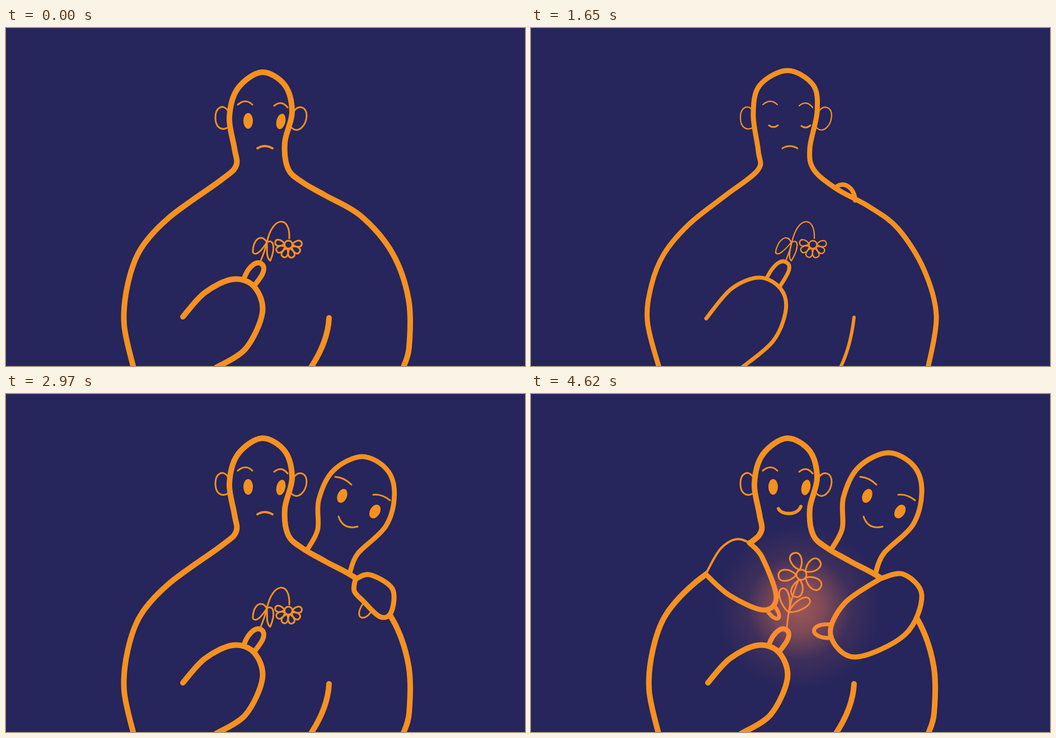
Recreate the animation shown at these times as an HTML page. Size 927 px wide and 604 px high, loop 6.93 s.

```html
<!DOCTYPE html>
<html lang="en">
<head>
<meta charset="utf-8">
<title>Comfort</title>
<style>
  @property --s { syntax: '<number>'; inherits: true; initial-value: 0; }
  html, body { margin: 0; width: 100%; height: 100%; overflow: hidden; background: #26255c; }
  svg {
    display: block; width: 100vw; height: 100vh;
    fill: none; stroke: #f5911f; stroke-width: 9;
    stroke-linecap: round; stroke-linejoin: round;
    animation: slot 6.93s steps(21) infinite;
  }
  /* --s counts the 330 ms slots of the loop, 0 to 20 */
  @keyframes slot { from { --s: 0; } to { --s: 21; } }
  /* shown from slot --a to slot --b */
  .on { opacity: clamp(0, min(var(--s) - var(--a) + 1, var(--b) - var(--s) + 1), 1); }
  /* the light figure jumps up and left for one slot */
  .nudge {
    --k: clamp(0, min(var(--s) - 5, 7 - var(--s)), 1);
    transform: translate(calc(var(--k) * -4px), calc(var(--k) * -3px));
  }
  .skin { fill: #26255c; }
  .dot { fill: #f5911f; stroke: none; }
  .w2 { stroke-width: 2.3; }
  .w3 { stroke-width: 3; }
  .w4 { stroke-width: 4; }
  .w6 { stroke-width: 6; }
  .w7 { stroke-width: 7; }
  .w8 { stroke-width: 8; }
  .w10 { stroke-width: 10; }
</style>
</head>
<body>
<svg viewBox="0 0 927 604">
  <defs>
    <radialGradient id="warm">
      <stop offset="0" stop-color="#ff8050" stop-opacity=".56"/>
      <stop offset=".3" stop-color="#ff8050" stop-opacity=".4"/>
      <stop offset=".62" stop-color="#ff8050" stop-opacity=".11"/>
      <stop offset="1" stop-color="#ff8050" stop-opacity="0"/>
    </radialGradient>

    <g id="features">
      <path d="M397 149C388 134 374 142 374 160C374 178 385 184 396 178"/>
      <path d="M514 149C523 136 537 141 537 157C536 174 522 190 510 178"/>
      <path d="M414 137Q428 125 440 137M479 139Q492 128 503 142"/>
    </g>
    <g id="eyes" class="dot">
      <ellipse cx="432.5" cy="166" rx="8.5" ry="14"/>
      <ellipse cx="491" cy="167" rx="8" ry="14" transform="rotate(13 491 167)"/>
    </g>
    <path id="shut" d="M425 174Q433 180 441 174M483 175Q491 181 499 174"/>
    <path id="frown" d="M449 215Q462 207 476 215"/>

    <g id="bold">
      <path class="w10" data-curve="228,608 211,530 217,460 240,396 291,339 385,271 411,246 408,215 399,160 414,108 457,79 498,102 511,150 498,205 504,252 530,276 570,299 634,336 690,402 719,485 720,570 709,608"/>
      <use href="#features" class="w3"/>
      <use href="#eyes"/>
      <path class="w10" d="M577 518Q575 560 545 606"/>
      <path class="w10" data-curve="316,516 355,473 405,449 443,462 458,508 428,573 375,607"/>
      <path d="M425 448C433 425 450 412 459 424C465 435 452 449 443 461"/>
    </g>

    <path id="stem" d="M455 416Q462 400 466 383C476 335 508 335 506 376"/>
    <path id="limp" d="M466 383C455 365 440 380 441 401C446 408 455 400 466 383C478 376 482 392 472 416C464 410 467 396 466 383"/>
    <path id="daisy" data-bloom="504.5,387 7 -5,39,6 17,11"/>
    <g id="wilt">
      <use href="#stem"/><use href="#limp"/><use href="#daisy"/>
    </g>
    <g id="leaves">
      <path data-bloom="460,390 0 255,73,2 44,17"/>
    </g>

    <path id="friend" data-curve="537,277 556,240 558,185 585,131 638,105 684,129 698,175 682,234 630,285 615,322"/>
    <g id="friendEyes" class="dot">
      <ellipse cx="600.5" cy="182" rx="8.5" ry="13" transform="rotate(22 600.5 182)"/>
      <ellipse cx="659" cy="210" rx="9" ry="13" transform="rotate(30 659 210)"/>
    </g>
  </defs>

  <!-- friend rising behind the shoulder -->
  <path class="on w8" style="--a:5;--b:5" d="M544 285C558 272 578 285 579 308"/>
  <path class="on w10" style="--a:6;--b:6" d="M534 272C570 255 602 282 598 311"/>
  <path class="on" style="--a:7;--b:7" d="M530 275C535 215 630 215 611 320"/>
  <g class="on" style="--a:8;--b:8">
    <path d="M521 268C505 180 620 165 638 250C645 285 628 300 616 322"/>
    <use href="#friendEyes" transform="translate(-38 76)"/>
  </g>
  <g class="on" style="--a:9;--b:9">
    <use href="#friend" transform="translate(576 300) scale(.965) translate(-576 -300)"/>
  </g>
  <use class="on" style="--a:10;--b:20" href="#friend"/>
  <g class="on" style="--a:9;--b:20">
    <use href="#friendEyes"/>
    <path class="w3" d="M588 148Q604 149 617 162M656 180Q671 178 686 190M594 219Q602 243 628 237"/>
  </g>

  <!-- light drawing of the sad figure -->
  <g class="on" style="--a:1;--b:8"><g class="nudge">
    <path data-curve="229,608 208,525 215,460 238,403 283,350 345,301 405,254 406,220 397,155 408,103 458,76 504,102 511,150 498,215 505,253 545,287 605,320 656,359 702,432 724,515 709,608"/>
    <use href="#features" class="w2"/>
    <use href="#frown" class="w3"/>
    <path class="w6" d="M577 517Q571 570 552 608"/>
    <path class="w7" data-curve="313,519 358,466 408,446 446,466 455,505 432,560 375,608"/>
    <path class="w7" d="M422 445C432 425 448 408 460 422C466 432 452 449 444 463"/>
    <g class="w2">
      <use href="#stem"/>
      <use href="#limp" transform="translate(66.5 0) skewX(-10)"/>
      <use href="#daisy" transform="translate(-1 0)"/>
    </g>
    <path class="on dot" style="--a:1;--b:1" d="M424 168A9 13 0 0 0 442 168ZM482 169A9 13 0 0 0 500 167Z"/>
    <use class="on w3" style="--a:2;--b:2" href="#shut"/>
    <use class="on" style="--a:3;--b:3" href="#eyes"/>
    <use class="on w3" style="--a:4;--b:5" href="#shut"/>
    <use class="on" style="--a:6;--b:8" href="#eyes"/>
  </g></g>

  <!-- bold figure -->
  <g class="on" style="--a:0;--b:0">
    <use href="#bold"/>
    <use href="#frown" class="w4"/>
    <use href="#wilt" class="w3"/>
  </g>
  <use class="on" style="--a:9;--b:20" href="#bold"/>
  <use class="on w4" style="--a:9;--b:13" href="#frown"/>
  <path class="on w6" style="--a:14;--b:20" d="M442 205C448 217 476 217 482 201"/>

  <!-- flower: drooping, lifting, upright -->
  <use class="on w3" style="--a:9;--b:12" href="#wilt"/>
  <use class="on w3" style="--a:13;--b:20" href="#leaves"/>
  <g class="on w3" style="--a:13;--b:13">
    <path d="M456 418C464 380 475 300 526 326"/>
    <use href="#daisy" transform="translate(22 -50)"/>
  </g>
  <g class="on w3" style="--a:14;--b:20">
    <path d="M457 417Q461 370 478 332"/>
    <path data-bloom="483,323 9 34,72,5 32,20"/>
  </g>

  <!-- hugging hands, thumbs tucked behind -->
  <g class="on" style="--a:9;--b:9">
    <path class="w3" d="M638 374C618 404 644 408 654 385"/>
    <path class="skin" data-curve="624,331 650,323 690,348 688,390 668,398 638,370 622,352 624,331"/>
  </g>
  <g class="on" style="--a:10;--b:10">
    <path class="w6" d="M602 398C574 398 578 426 606 418"/>
    <path class="skin" data-curve="622,329 665,322 695,358 668,418 610,418 600,365 622,329"/>
    <path class="skin w6" data-curve="312,322 340,278 372,268 379,305 350,328 312,322"/>
  </g>
  <g class="on" style="--a:11;--b:11">
    <path class="w6" d="M546 410C506 408 508 440 541 434"/>
    <path class="skin" data-curve="622,329 665,322 698,358 670,425 590,471 542,440 555,398 622,329"/>
    <path class="w4" d="M390 349C412 366 424 350 403 333"/>
    <path class="skin w4" data-curve="312,322 340,276 375,260 405,295 394,340 355,352 312,322"/>
    <path class="w8" d="M312 322C340 354 372 364 394 340"/>
  </g>
  <g class="on" style="--a:12;--b:12">
    <path class="w7" d="M540 413C488 416 500 436 538 436"/>
    <path class="skin" data-curve="622,329 665,322 698,358 672,427 580,469 538,436 560,388 622,329"/>
    <path class="w6" d="M420 384C438 410 456 398 436 377"/>
    <path class="skin" data-curve="314,322 340,276 378,263 418,300 436,355 410,383 350,358 314,322"/>
  </g>
  <g class="on" style="--a:13;--b:20">
    <path class="w7" d="M537 412C494 408 496 438 537 436"/>
    <path class="skin" data-curve="624,330 665,322 698,360 668,430 578,470 535,430 560,374 624,330"/>
    <path class="w7" d="M421 386C438 412 454 402 434 378"/>
    <path class="skin w4" data-curve="312,322 340,275 376,260 413,292 438,362 415,386 355,360 312,322"/>
    <path data-curve="390,266 413,292 438,362 415,386 355,360 312,322"/>
  </g>

  <!-- glow -->
  <g fill="url(#warm)" stroke="none">
    <g class="on" style="--a:11;--b:11"><circle cx="478" cy="420" r="118" opacity=".65"/></g>
    <g class="on" style="--a:12;--b:12"><circle cx="484" cy="390" r="88"/></g>
    <g class="on" style="--a:13;--b:20"><circle cx="479" cy="382" r="150"/></g>
  </g>
</svg>
<script>
  const numbers = text => text.split(',').map(Number);

  // Smooth open curve through a few key points.
  function curve(pts) {
    const at = i => pts[Math.min(pts.length - 1, Math.max(0, i))];
    return pts.slice(1).reduce((d, b, i) => {
      const p = at(i - 1), a = at(i), q = at(i + 2);
      const c1 = a.map((v, k) => v + (b[k] - p[k]) / 6);
      const c2 = b.map((v, k) => v - (q[k] - a[k]) / 6);
      return d + `C${c1} ${c2} ${b}`;
    }, 'M' + pts[0]);
  }

  // Petals of equal size around a disc, one every `step` degrees.
  function bloom([x, y], [r], [from, step, count], [len, width]) {
    let d = r ? `M${x - r} ${y}a${r} ${r} 0 1 1 ${2 * r} 0a${r} ${r} 0 1 1 ${-2 * r} 0` : '';
    for (let i = 0; i < count; i++) {
      const t = (from + i * step) * Math.PI / 180, c = Math.cos(t), s = Math.sin(t);
      const at = (u, v) => [x + c * (r + u) - s * v, y + s * (r + u) + c * v];
      const w = width * .67;
      d += `M${at(0, 0)}C${at(len * .4, w)} ${at(len, w)} ${at(len, 0)}`
         + `C${at(len, -w)} ${at(len * .4, -w)} ${at(0, 0)}`;
    }
    return d;
  }

  for (const path of document.querySelectorAll('path')) {
    const { curve: c, bloom: b } = path.dataset;
    if (c) path.setAttribute('d', curve(c.split(' ').map(numbers)));
    if (b) path.setAttribute('d', bloom(...b.split(' ').map(numbers)));
  }
</script>
</body>
</html>
```
